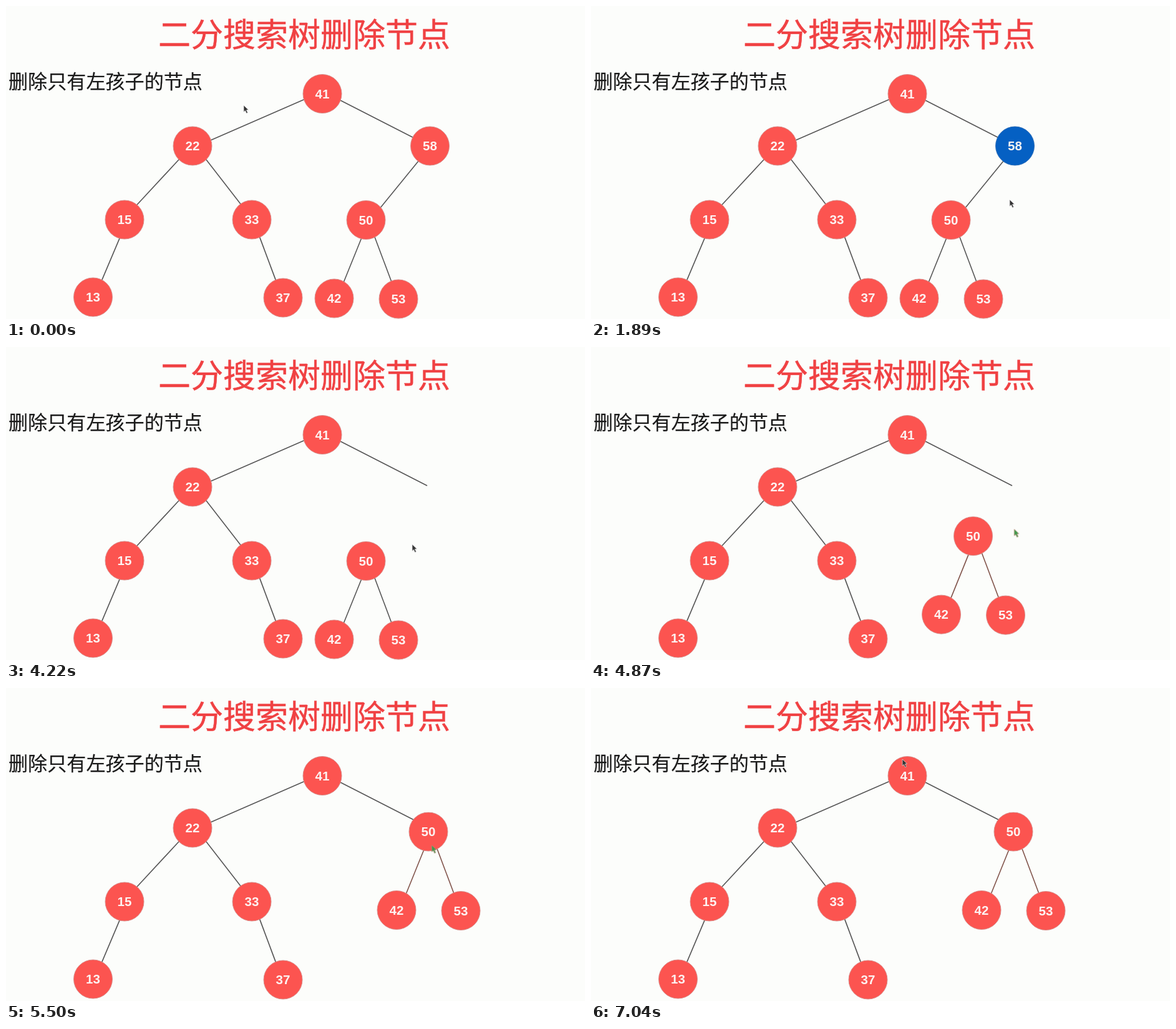
These frames come from a looping animation (928 px wide and 501 px high, 7.21 s). An HTML page:

```html
<!DOCTYPE html>
<html lang="zh-CN">
<head>
<meta charset="utf-8">
<title>二分搜索树删除节点</title>
<style>
html, body { margin: 0; width: 100%; height: 100%; overflow: hidden; background: #fcfdfb; }
svg { display: block; width: 928px; height: 501px; }
.zh { font-family: "Noto Sans CJK SC", "Noto Sans CJK", "Noto Sans SC", sans-serif; }
.title { font-size: 52px; fill: #f04143; stroke: #f04143; stroke-width: .5; }
.sub { font-size: 31.1px; fill: #1a1a1a; stroke: #1a1a1a; stroke-width: .2; }
.node circle { fill: #fc5450; stroke: #d58d89; stroke-width: .9; }
.node text { font: bold 20.5px "Liberation Sans", Arial, sans-serif; fill: #fdf3f2; text-anchor: middle; }
.edge { stroke: #555; stroke-width: 1.6; }

.anim { animation: 7210ms linear infinite; }
.cursor { animation-name: point; }
.cursor path { fill: #333; stroke: #e4e4e4; stroke-width: .7; animation-name: tint; }
#n58 { animation-name: vanish; }
#n58 circle { animation: mark 7210ms linear infinite; }
#link { stroke-dasharray: 1 2; animation-name: wipe; }
#branch { animation-name: lift; }
#branch .edge { animation: warm 7210ms step-end infinite; }

@keyframes point {
  0%, 2.17% { transform: translate(381px, 159px); }
  8.7% { transform: translate(560px, 232px); }
  15.2%, 18% { transform: translate(692px, 250px); }
  26.09% { transform: translate(671px, 310px); }
  32.6% { transform: translate(688px, 316px); }
  39.13% { transform: translate(646px, 128px); }
  45.6%, 48% { transform: translate(770px, 148px); }
  58.7%, 61% { transform: translate(651px, 316px); }
  71.74% { transform: translate(697px, 275px); }
  84.78% { transform: translate(653px, 205px); }
  91.3% { transform: translate(586px, 112px); }
  97.83%, 100% { transform: translate(499px, 114px); }
}
@keyframes tint {
  0%, 65% { fill: #333; stroke: #e4e4e4; }
  65.1%, 86% { fill: #3d9a4c; stroke: #c98a80; }
  86.1%, 100% { fill: #333; stroke: #e4e4e4; }
}
@keyframes mark {
  0%, 15.2% { fill: #fc5450; stroke: #d58d89; }
  19.6%, 100% { fill: #0560c3; stroke: #2b6cb5; }
}
@keyframes vanish {
  0%, 32.6% { opacity: 1; }
  38%, 100% { opacity: 0; }
}
@keyframes wipe {
  0%, 32.6% { stroke-dashoffset: 0; opacity: 1; }
  39.13% { stroke-dashoffset: .66; opacity: 1; }
  42.4% { stroke-dashoffset: 1; opacity: 1; }
  42.5%, 100% { stroke-dashoffset: 1; opacity: 0; }
}
@keyframes lift {
  0%, 60.87% { transform: translate(0, 0); animation-timing-function: cubic-bezier(.45, 0, .8, .8); }
  71.74% { transform: translate(82px, -92px); animation-timing-function: ease-out; }
  76.1%, 100% { transform: translate(100px, -112.5px); }
}
@keyframes warm {
  0% { stroke: #555; }
  62%, 100% { stroke: #80534a; }
}
</style>
</head>
<body>
<svg viewBox="0 0 928 501">
  <text class="zh title" x="244" y="65">二分搜索树删除节点</text>
  <text class="zh sub" x="4" y="131.5">删除只有左孩子的节点</text>
  <g id="tree"></g>
  <line id="link" class="edge anim" pathLength="1" x1="600" y1="323" x2="662" y2="247"/>
  <g id="n58" class="anim"></g>
  <g id="branch" class="anim"></g>
  <g class="cursor anim">
    <path class="anim" d="M0 0V10.5L2.4 8.4L4.4 12.8L6.4 11.8L4.4 7.6L7.5 7.2Z"/>
  </g>
</svg>
<script>
const edge = (x1, y1, x2, y2) =>
  `<line class="edge" x1="${x1}" y1="${y1}" x2="${x2}" y2="${y2}"/>`;
const node = (n, x, y) =>
  `<g class="node"><circle cx="${x}" cy="${y}" r="31"/><text x="${x}" y="${y + 7.2}">${n}</text></g>`;
const fill = (id, edges, nodes) => {
  document.getElementById(id).innerHTML =
    edges.map(e => edge(...e)).join('') + nodes.map(n => node(...n)).join('');
};

fill('tree', [
  [481, 148.3, 326, 215.7], [534, 150, 675, 222], [279, 243.8, 208, 320.2],
  [319, 243.5, 378, 319.5], [183, 369.6, 153, 440.4], [406, 368.4, 433, 440.6]
], [
  [41, 507, 140.5], [22, 299, 224], [15, 190, 342],
  [33, 394, 342], [13, 139.5, 466], [37, 444, 467]
]);
fill('n58', [], [[58, 679.5, 224]]);
fill('branch', [[571, 368.5, 541, 442.5], [590, 367.3, 618, 441.7]],
  [[50, 577, 342.5], [42, 526, 468], [53, 629, 469]]);

// Show the timeline in 46 even steps per loop.
const LOOP = 7210, STEPS = 46;
const anims = document.getAnimations();
anims.forEach(a => a.pause());
const start = performance.now();

function draw(now) {
  const t = Math.max(0, now - start) % LOOP;
  const step = Math.min(STEPS - 1, Math.floor((t + 13) * STEPS / LOOP));
  anims.forEach(a => { a.currentTime = step * LOOP / STEPS; });
  requestAnimationFrame(draw);
}
draw(start);
</script>
</body>
</html>
```
